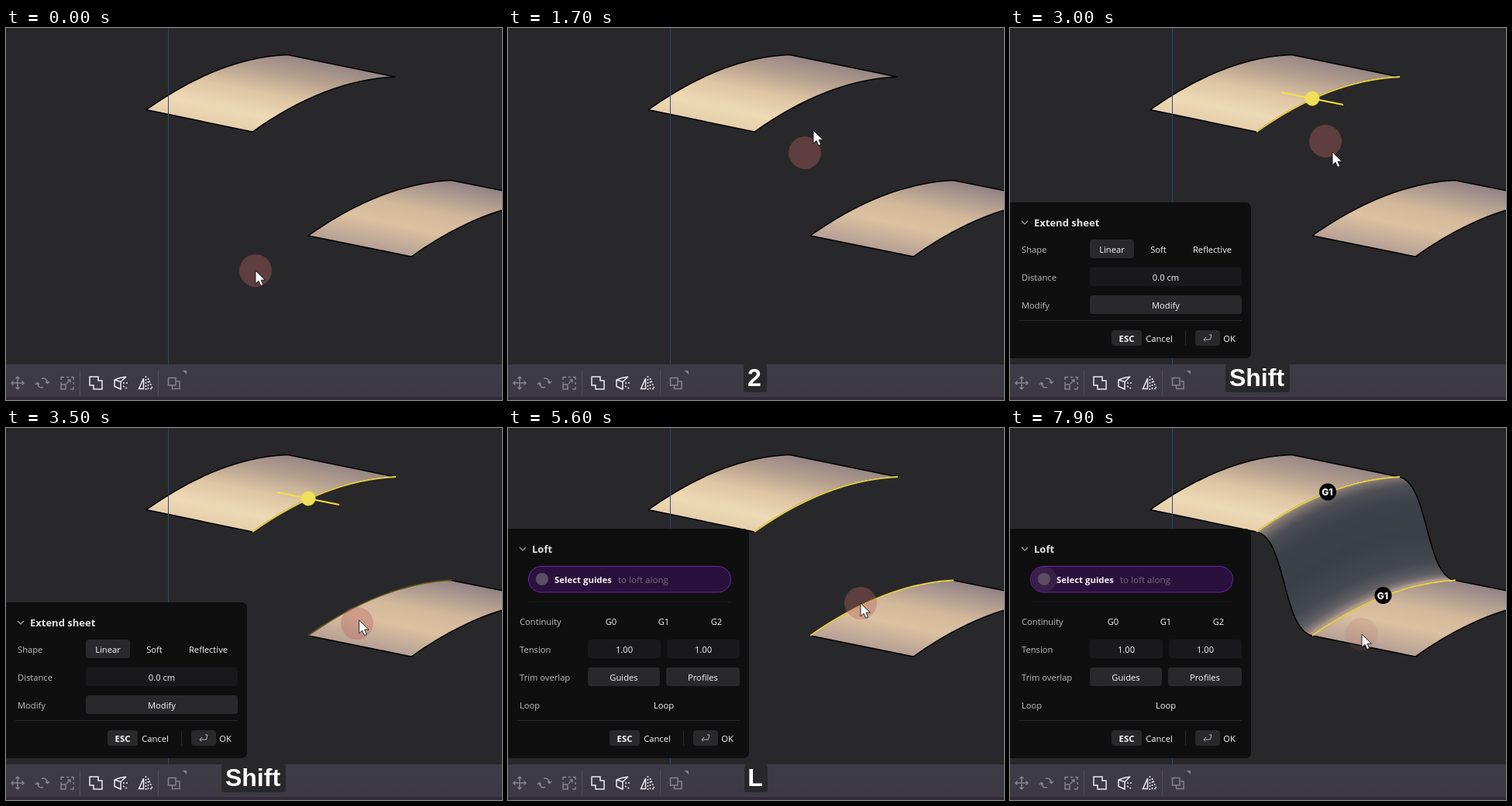
Animation, 640 px wide and 480 px high, one loop 8 s. Source, as an HTML page:

```html
<!DOCTYPE html>
<html lang="en">
<head>
<meta charset="utf-8">
<title>Loft between two sheets</title>
<style>
  html, body { margin: 0; width: 100%; height: 100%; overflow: hidden; background: #28282a; }
  svg { display: block; width: 100%; height: 100%; }
  text { font: 500 11.2px "Open Sans", "Noto Sans", sans-serif; fill: #f8f8f8; }
  .label { font-weight: 400; fill: #c0c0c2; }
  .title { font-size: 13px; font-weight: 700; fill: #e4e4e6; }
  .bold { font-size: 11.4px; font-weight: 700; }
  .hint { font-size: 11.6px; font-weight: 400; fill: #77687f; }
  .key text { font: bold 32px "Liberation Sans", Arial, sans-serif; fill: #fff; text-anchor: middle; }
  .badge text { font: 800 12px Inter, "Liberation Sans", sans-serif; fill: #fff; text-anchor: middle; }
  .mid { text-anchor: middle; }
  .outline { fill: none; stroke: #000; stroke-width: 1.5; stroke-linejoin: round; }
  .edge { fill: none; stroke: #e6cf4b; stroke-width: 2; }
  .gizmo { stroke: #f4e040; stroke-width: 2; fill: #efe05a; }
  .icon { fill: none; stroke: #85838d; stroke-width: 1.5; }
  .icon.on { stroke: #ecebf0; }
  .dotted { stroke-dasharray: 2 2; }
</style>
</head>
<body>
<svg viewBox="0 0 640 480" preserveAspectRatio="none">
  <defs>
    <linearGradient id="skinA" gradientUnits="userSpaceOnUse" x1="181" y1="105" x2="203" y2="0">
      <stop offset="0" stop-color="#e5cfab"/><stop offset=".2" stop-color="#eed9b5"/>
      <stop offset=".48" stop-color="#dec5a4"/><stop offset=".75" stop-color="#b7a08f"/>
      <stop offset="1" stop-color="#958584"/>
    </linearGradient>
    <linearGradient id="skinB" gradientUnits="userSpaceOnUse" x1="390" y1="268" x2="412" y2="163">
      <stop offset="0" stop-color="#b59f95"/><stop offset=".35" stop-color="#dbc1a0"/>
      <stop offset=".58" stop-color="#d3b99b"/><stop offset="1" stop-color="#938386"/>
    </linearGradient>
    <linearGradient id="barFill" x1="0" y1="0" x2="0" y2="1">
      <stop offset="0" stop-color="#3d3b46"/><stop offset=".9" stop-color="#3c3944"/>
      <stop offset=".92" stop-color="#352c3b"/><stop offset="1" stop-color="#332a39"/>
    </linearGradient>
    <clipPath id="loftClip"><path id="loftShape"/></clipPath>
    <clipPath id="pillClip"><rect x="26.5" y="178.5" width="261" height="34" rx="17"/></clipPath>
  </defs>

  <rect width="640" height="480" fill="#28282a"/>
  <path d="M181 105.500Q276 38 363 34.500L502 63Q412 67 318 134Z" class="outline" style="fill:url(#skinA)"/>
  <path d="M390 268Q485 201 574 196.500L707 223Q617 228 523 295Z" class="outline" style="fill:url(#skinB)"/>
  <path d="M209.5 0V434" stroke="#2b4580"/>
  <g id="loft">
    <g id="strips" clip-path="url(#loftClip)" fill="none" stroke-width="7"></g>
    <path class="outline" d="M318 134C357 142 351 260 390 268M502 63C541 71 535 189 574 197"/>
  </g>
  <path id="edgeA" class="edge" d="M318 134Q412 67 503 63"/>
  <path id="edgeB" class="edge" d="M390 268Q485 201 575 196.500"/>
  <g id="gizmo" class="gizmo"><path d="M-40-8L40 8"/><circle r="9" stroke-width="1"/></g>
  <g id="badges" class="badge">
    <circle cx="410" cy="82.5" r="11"/><text x="409.5" y="87">G1</text>
    <circle cx="481.5" cy="216" r="11"/><text x="481" y="220.5">G1</text>
  </g>

  <g id="bar">
    <rect y="434" width="640" height="46" fill="url(#barFill)"/>
    <path d="M95.500 442V474M196.500 442V474" stroke="#504e59"/>
    <path class="icon" d="M7 458H23M15 450V466M9.500 455.500L7 458L9.500 460.500M20.500 455.500L23 458L20.500 460.500M12.500 452.500L15 450L17.500 452.500M12.500 463.500L15 466L17.500 463.500"/>
    <path class="icon" d="M46 452.500C50 451 53.500 454 53.500 458M51 456L53.500 458.500L56 456M48 463.500C44 465 40.500 462 40.500 458M38 460L40.500 457.500L43 460"/>
    <path class="icon" d="M71 454V450.500H75M78 450.500H81M84 450.500H87V454M87 457V460M87 463V466H83M71 457V459M71 460H77V466H71ZM78 459L83 454M79.500 454H83V457.500"/>
    <path class="icon on" d="M108 450H119V455H124V466H113V461H108Z"/>
    <path class="icon on" d="M155 450L147 451.500L140 454V462.500L148 466V456.500L140 454M148 456.500L155 450"/>
    <path class="icon on dotted" d="M151 458H157M151 462L156 465"/>
    <path class="icon on" d="M177.500 452V465.500H171.500Z"/>
    <path class="icon on dotted" d="M180.500 449V467M183.500 452V465.500H189Z"/>
    <path class="icon" d="M209.500 451.500H219V461H209.500ZM214.500 461V465.500H224V456H219"/>
    <path d="M228 442H233V447Z" fill="#85838d"/>
  </g>

  <g id="extendPanel"></g>
  <g id="loftPanel"></g>
  <g id="keys"></g>

  <circle id="trail" r="21" fill="#b66263" fill-opacity=".38"/>
  <path id="cursor" d="M0 0V17L4 13.300L6.700 19.500L9.700 18.200L7 12.200H12.300Z" fill="#fff" stroke="#111" stroke-width=".9"/>
</svg>
<script>
const LOOP = 8000, STEP = 100;
const $ = id => document.getElementById(id);
const mix = (a, b, p) => a + (b - a) * p;
const ramp = (t, from, to) => Math.min(1, Math.max(0, (t - from) / (to - from)));

// Panel building blocks
const text = (x, y, s, cls = 'mid') => `<text x="${x}" y="${y}" class="${cls}">${s}</text>`;
const box = (x, y, w, h, fill = '#29292b', rx = 4) =>
  `<rect x="${x}" y="${y}" width="${w}" height="${h}" rx="${rx}" fill="${fill}"/>`;
const field = (x, y, w, s, fill) => box(x, y - 17, w, 24, fill) + text(x + w / 2, y, s);
const panel = (top, title, rows) =>
  box(-8, top, 319, 426 - top, '#0f0f10', 7) +
  `<path d="M15 ${top + 24}l4 4l4-4" fill="none" stroke="#a5a5a8" stroke-width="1.2"/>` +
  text(31, top + 31, title, 'title') + rows +
  '<path d="M12 377.5H299M226.5 391V410" stroke="#29292b"/>' +
  box(131, 390, 39, 20) + text(150.5, 405, 'ESC', 'mid bold') + text(192.5, 405, 'Cancel') +
  box(239, 390, 32, 20) + text(283, 405, 'OK') +
  '<path d="M257 396H260L258.5 402H250M253 399L250 402L252 404.5" fill="none" stroke="#b4b4b7"/>';
const label = (y, s) => text(15, y, s, 'label');
const DARK = '#19191b';

$('extendPanel').innerHTML = panel(225, 'Extend sheet',
  label(290, 'Shape') + field(103, 290, 57, 'Linear') + text(191.5, 290, 'Soft') + text(261, 290, 'Reflective') +
  label(326, 'Distance') + field(103, 326, 196, '0.0 cm', DARK) +
  label(362, 'Modify') + field(103, 362, 196, 'Modify'));

$('loftPanel').innerHTML = panel(130, 'Loft',
  '<rect x="26.5" y="178.5" width="261" height="33.5" rx="16.7" fill="#2a113d" stroke="#6b24a2"/>' +
  '<circle id="halo" cx="44" cy="195" fill="#76607f" clip-path="url(#pillClip)"/>' +
  '<circle cx="44" cy="195" r="8" fill="#5b4d62"/>' +
  text(60, 200, 'Select guides', 'bold') + text(142, 200, 'to loft along', 'hint') +
  '<path d="M27 224.5H287" stroke="#1b1b1d"/>' +
  label(254, 'Continuity') + text(133, 254, 'G0') + text(201, 254, 'G1') + text(269, 254, 'G2') +
  label(290, 'Tension') + field(103, 290, 94, '1.00', DARK) + field(205, 290, 94, '1.00', DARK) +
  label(326, 'Trim overlap') + field(103, 326, 93, 'Guides') + field(204, 326, 95, 'Profiles') +
  label(362, 'Loop') + text(201, 362, 'Loop'));

// Pressed keys: name, x, width, fade-in span, fade-out span
const keys = [
  ['2', 304, 30, 500, 700, 1700, 1900],
  ['Shift', 278, 83, 2500, 2700, 4000, 4200],
  ['L', 305, 30, 5500, 5600, 6700, 6900]
];
$('keys').innerHTML = keys.map(([name, x, w]) =>
  `<g class="key">${box(x, 434, w, 36, '#28282a', 3)}${text(x + w / 2 - 1, 462, name, '')}</g>`).join('');

// The loft sweeps the sheet edge along an S-shaped rail
const rail = [[0, 0], [39, 8], [33, 126], [72, 134]];
const bezier = (p, axis) => {
  const q = 1 - p, [a, b, c, d] = rail.map(v => v[axis]);
  return q * q * q * a + 3 * q * q * p * b + 3 * q * p * p * c + p * p * p * d;
};
const shades = [
  [0, 188, 166, 144], [.08, 128, 117, 113], [.18, 78, 79, 86], [.32, 61, 65, 73],
  [.55, 59, 63, 70], [.75, 68, 72, 79], [.88, 96, 95, 101], [.95, 136, 125, 122], [1, 176, 156, 142]
];
// Interpolates rows of [position, ...values]
const sample = (rows, at) => {
  if (at <= rows[0][0]) return rows[0].slice(1);
  const i = rows.findIndex(r => r[0] >= at);
  if (i < 0) return rows[rows.length - 1].slice(1);
  const a = rows[i - 1], b = rows[i], p = (at - a[0]) / (b[0] - a[0]);
  return a.slice(1).map((v, k) => mix(v, b[k + 1], p));
};
$('loftShape').setAttribute('d',
  'M318 134Q412 67 502 63C541 71 535 189 574 197Q485 201 390 268C351 260 357 142 318 134Z');
$('strips').innerHTML = Array.from({ length: 81 }, (_, i) => {
  const p = i / 80;
  return `<path d="M318 134Q412 67 502 63" transform="translate(${bezier(p, 0)} ${bezier(p, 1)})"
    stroke="rgb(${sample(shades, p).map(Math.round)})"/>`;
}).join('');

// Pointer stops: time, x, y
const stops = [
  [1000, 322, 313], [1100, 327, 300], [1600, 383, 161], [1700, 394, 132], [1800, 394, 117],
  [2600, 394, 117], [2900, 407, 146], [3000, 416, 160], [3100, 416, 161],
  [3200, 416, 161], [3400, 453, 252], [3450, 456, 259], [3600, 455, 226],
  [6500, 455, 226], [6700, 495, 232], [6900, 526, 250], [7100, 488, 270], [7300, 454, 266]
];

const show = (id, opacity) => { $(id).style.opacity = +opacity; };
const place = (id, x, y) => $(id).setAttribute('transform', `translate(${x} ${y})`);

function render(t) {
  place('cursor', ...sample(stops, t));
  place('trail', ...sample(stops, t - 100));
  show('trail', mix(1, .4, ramp(t, 6600, 7400)));

  show('edgeA', ramp(t, 1900, 2100));
  show('edgeB', t < 3900 ? .6 * ramp(t, 3300, 3600) : 1);
  show('gizmo', t >= 2400 && t < 5600);
  place('gizmo', ...(t < 4000 ? [390, 91] : [456, 227]));

  show('extendPanel', t < 5600 ? ramp(t, 2300, 2500) : 0);
  show('loftPanel', t >= 5600);
  show('loft', t >= 5800);
  show('badges', t >= 5800);

  const pulse = ramp((t - 5600) % 1000, 0, 800);
  $('halo').setAttribute('r', mix(8, 30, pulse));
  show('halo', .3 * (1 - pulse));

  keys.forEach(([, , , inA, inB, outA, outB], i) => {
    $('keys').children[i].style.opacity = ramp(t, inA, inB) * (1 - ramp(t, outA, outB));
  });
}

const start = performance.now();
function tick() {
  const t = (performance.now() - start) % LOOP;
  render(Math.floor(t / STEP) * STEP);
  requestAnimationFrame(tick);
}
tick();
</script>
</body>
</html>
```
